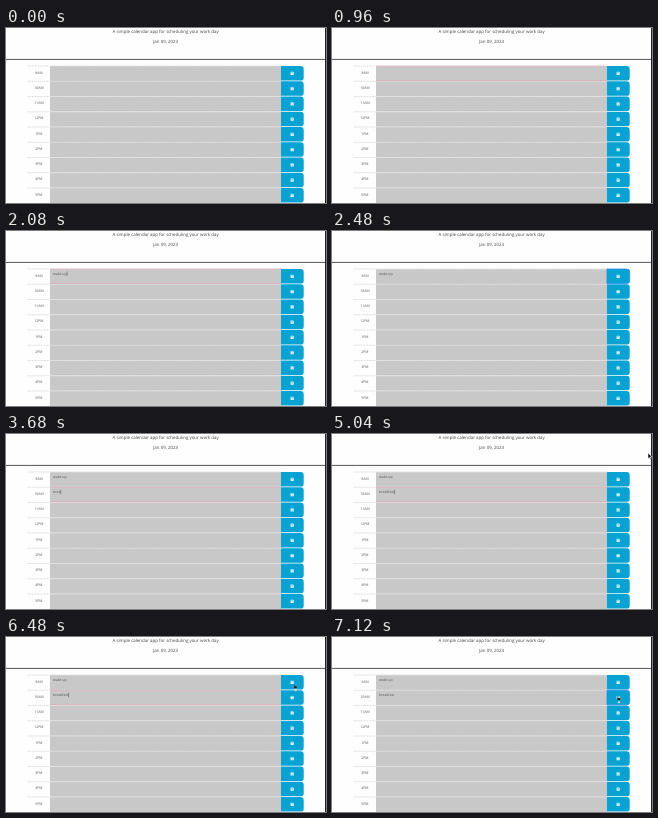
An HTML page for the animation above (8 s loop, 320 by 175 pixels).

```html
<!DOCTYPE html>
<html lang="en">
<head>
<meta charset="utf-8">
<title>Work day scheduler</title>
<style>
html, body { margin: 0; width: 100%; height: 100%; overflow: hidden; background: #fff; }
svg { display: block; width: 100vw; height: 100vh; }
text { font-family: "Open Sans", "Noto Sans", sans-serif; font-size: 3.5px; fill: #555; text-rendering: geometricPrecision; }
.lead { font-size: 4.43px; fill: #444; }
.mid { text-anchor: middle; }
</style>
</head>
<body>
<svg viewBox="0 0 320 175" preserveAspectRatio="none">
  <rect width="320" height="175" fill="#fefefe"/>
  <text class="lead mid" x="159.6" y="4.9">A simple calendar app for scheduling your work day</text>
  <text class="lead mid" x="159.6" y="15.3">Jan 09, 2023</text>
  <path d="M0 31.4H320" stroke="#555" stroke-width="1"/>
  <path d="M319.5 0V175" stroke="#222"/>
  <g id="rows"></g>
  <path id="ring" fill="none" stroke="#e2a0ae" stroke-width=".6"/>
  <path id="edge" fill="none" stroke="#2a86ee" stroke-width=".8"/>
  <rect id="caret" width=".5" height="4.4" fill="#444"/>
  <circle id="ripple" fill="none" stroke="#d5eef8" stroke-width=".9"/>
  <g id="mouse">
    <path id="arrow" d="M0 0V5.6L1.4 4.4L2.3 6.4L3.2 6L2.3 4H4Z" fill="#111" stroke="#fff" stroke-width=".5"/>
    <g id="hand">
      <path d="M.1 .2Q.7 -.3 1.1 .3V1.7L3.2 2.2Q3.7 2.5 3.5 3.2L3.1 4.6H.9L-.8 2.9Q-.8 2.2 -.2 2.4L.1 2.7Z" fill="#123" stroke="#cfe6ef" stroke-width=".3"/>
      <rect x=".6" y="5.3" width="2.4" height="2" rx=".8" fill="#e9cfd0"/>
    </g>
  </g>
</svg>
<script>
const LOOP = 8000, TOP = 37.8, PITCH = 15.25;
const $ = id => document.getElementById(id);
const rowY = i => TOP + PITCH * i;
const button = y => `M275 ${y + .2}h19.5q3.2 0 3.2 3.2v8.2q0 3.2 -3.2 3.2h-19.5z`;

function add(tag, attrs, text = '') {
  const el = document.createElementNS('http://www.w3.org/2000/svg', tag);
  for (const k in attrs) el.setAttribute(k, attrs[k]);
  el.textContent = text;
  return $('rows').appendChild(el);
}

const hours = ['9AM', '10AM', '11AM', '12PM', '1PM', '2PM', '3PM', '4PM', '5PM'];
const notes = hours.map((hour, i) => {
  const y = rowY(i);
  add('path', { d: `M21.5 ${y + .2}H44`, stroke: '#bbb', 'stroke-width': .5, 'stroke-dasharray': '1 .5' });
  add('text', { x: 32.9, y: y + 7.8, class: 'mid' }, hour);
  add('rect', { x: 44, y, width: 231, height: PITCH, fill: '#c8c8c8' });
  add('path', { d: `M44 ${y + .2}H275`, stroke: '#eee', 'stroke-width': .7, 'stroke-dasharray': '1.2 .5' });
  add('path', { d: button(y), fill: '#08a3d2' });
  add('path', { d: `M284.6 ${y + 5.9}h2.4l.7 .7v2.5h-3.1z`, fill: '#f4fafc' });
  add('path', { d: `M285.1 ${y + 6.4}h1.6v.6h-1.6zM285.8 ${y + 7.8}h.7v.7h-.7z`, fill: '#08a3d2' });
  return add('text', { x: 47, y: y + 6.2 });
});

// [time, number of letters]
const typing = [
  ['wake up', [[0, 0], [1360, 1], [1440, 2], [1520, 3], [1600, 4], [1840, 5], [2000, 6], [2080, 7]]],
  ['breakfast', [[0, 0], [3280, 1], [3520, 2], [3680, 4], [3920, 5], [4240, 7], [4480, 8], [4800, 9]]]
];
// [time, focused row, focused part]
const focus = [[0, -1, ''], [960, 0, 'note'], [2320, 0, 'save'], [3040, 1, 'note'], [6960, 1, 'save']];
// [time, x, y]
const path = [[5040, 316, 19], [5360, 305, 33], [5840, 287.6, 43], [6320, 287.6, 43], [6640, 288, 51], [6960, 285.2, 59], [8000, 285.2, 59]];
const clicks = [5840, 6720], RIPPLE = 320;

const at = (steps, t) => steps.filter(s => s[0] <= t).pop();

function along(t) {
  const i = Math.max(1, path.findIndex(p => p[0] > t));
  const [t0, x0, y0] = path[i - 1], [t1, x1, y1] = path[i];
  const k = (t - t0) / (t1 - t0), e = k * k * (3 - 2 * k);
  return [x0 + (x1 - x0) * e, y0 + (y1 - y0) * e];
}

const show = (id, on) => { $(id).style.display = on ? '' : 'none'; };

function set(id, attrs) {
  for (const k in attrs) $(id).setAttribute(k, attrs[k]);
}

function draw(now) {
  const t = Math.floor((now % LOOP) / 80) * 80;
  typing.forEach(([word, steps], i) => {
    const text = word.slice(0, at(steps, t)[1]);
    if (notes[i].textContent !== text) notes[i].textContent = text;
  });

  const [, row, part] = at(focus, t);
  const inNote = part === 'note', y = rowY(Math.max(row, 0));
  show('ring', inNote);
  show('edge', part === 'save');
  show('caret', inNote && notes[row].textContent);
  set('ring', { d: `M44 ${y + .3}H275M44 ${y + 14.7}H275` });
  set('edge', { d: button(y) });
  if (inNote) set('caret', { x: 47.2 + notes[row].getComputedTextLength(), y: y + 2.7 });

  const moving = t >= path[0][0];
  const click = clicks.find(c => t >= c && t < c + RIPPLE);
  show('mouse', moving);
  show('ripple', click);
  if (!moving) return;
  const [mx, my] = along(t);
  const over = mx > 275 && mx < 298 && my > TOP;
  show('hand', over);
  show('arrow', !over);
  set('mouse', { transform: `translate(${mx} ${my})` });
  if (click) {
    const k = (t - click) / RIPPLE;
    set('ripple', { cx: mx + 1.4, cy: my + 2, r: 5 + 6 * k, opacity: 1 - k });
  }
}

const start = performance.now();
function tick() {
  draw(performance.now() - start);
  requestAnimationFrame(tick);
}
tick();
</script>
</body>
</html>
```
